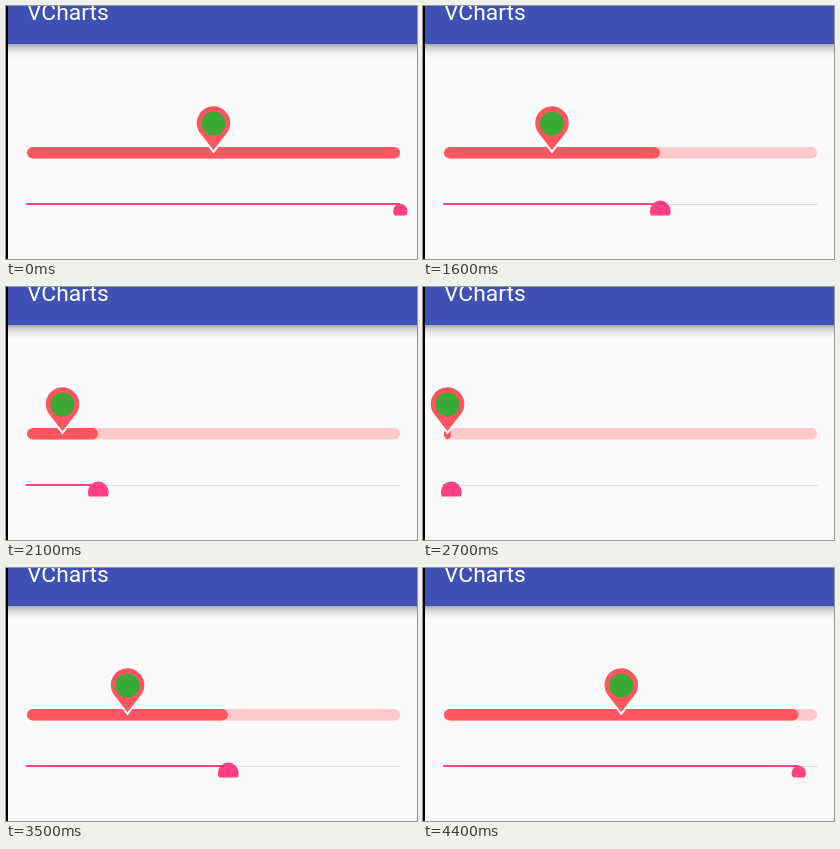
An HTML page with a canvas that plays this animation: 411x253 px, repeating every 4.6 s.

```html
<!DOCTYPE html>
<html lang="en">
<head>
<meta charset="utf-8">
<title>VCharts</title>
<style>
  html, body { margin: 0; width: 100%; height: 100%; overflow: hidden; background: #fafafa; }
  canvas { position: absolute; left: 0; top: 0; width: 411px; height: 253px; }
  h1 {
    position: absolute; left: 21px; top: -8px; margin: 0;
    font: 400 22.8px/30px Roboto, sans-serif; color: #fff; white-space: nowrap;
  }
</style>
</head>
<body>
<canvas id="stage" width="411" height="253"></canvas>
<h1>VCharts</h1>
<script>
const ctx = document.getElementById('stage').getContext('2d');
const LOOP = 4600, STEP = 100;
const BAR = { left: 21, right: 394, top: 141, height: 11.5 };
const RED = '#ff5560', PINK = '#ff4081';

// [time in ms, x of the progress end]
const keys = [
  [1200, 394], [1600, 237], [1700, 201], [2100, 92], [2300, 37], [2500, 21],
  [2600, 21], [2700, 28], [3200, 98], [3500, 222], [3800, 308], [4400, 375.5]
];

const slope = i => (keys[i + 1][1] - keys[i][1]) / (keys[i + 1][0] - keys[i][0]);

// Harmonic mean keeps the curve free of overshoot.
function tangent(i) {
  if (i === 0 || i === keys.length - 1) return 0;
  const a = slope(i - 1), b = slope(i);
  return a * b > 0 ? 2 * a * b / (a + b) : 0;
}

function progressAt(t) {
  if (t <= 1200) return 394;
  if (t >= 4400) return 375.5;
  const i = keys.findIndex((k, n) => t < keys[n + 1][0]);
  const [t0, x0] = keys[i], [t1, x1] = keys[i + 1];
  const d = t1 - t0, u = (t - t0) / d, v = 1 - u;
  return x0 * (1 + 2 * u) * v * v + tangent(i) * d * u * v * v
       + x1 * u * u * (3 - 2 * u) - tangent(i + 1) * d * u * u * v;
}

function rect(x, y, w, h, fill) {
  ctx.fillStyle = fill;
  ctx.fillRect(x, y, w, h);
}

function disc(x, y, r, fill) {
  ctx.fillStyle = fill;
  ctx.beginPath();
  ctx.arc(x, y, r, 0, Math.PI * 2);
  ctx.fill();
}

function bar(end, fill) {
  const { left, top, height } = BAR, w = end - left;
  if (w < 0.5) return;
  const ry = height / 2, rx = Math.min(ry, w / 2), y = top + ry;
  ctx.fillStyle = fill;
  ctx.beginPath();
  ctx.ellipse(left + rx, y, rx, ry, 0, Math.PI / 2, Math.PI * 1.5);
  ctx.ellipse(end - rx, y, rx, ry, 0, -Math.PI / 2, Math.PI / 2);
  ctx.fill();
}

function pin(x) {
  const y = 117, r = 16.8, tip = 144.3;
  const a = Math.acos(r / (tip - y));
  ctx.beginPath();
  ctx.arc(x, y, r, Math.PI / 2 + a, Math.PI * 2.5 - a);
  ctx.lineTo(x, tip);
  ctx.closePath();
  ctx.lineWidth = 4;
  ctx.strokeStyle = '#fff';
  ctx.stroke();
  ctx.fillStyle = RED;
  ctx.fill();
  disc(x, 117.5, 12, '#3aaa35');
}

function header() {
  rect(0, 0, 411, 253, '#fafafa');
  const shade = ctx.createLinearGradient(0, 38, 0, 52);
  shade.addColorStop(0, '#a9a9ad');
  shade.addColorStop(0.25, '#cfcfd1');
  shade.addColorStop(0.6, '#ececec');
  shade.addColorStop(1, '#fafafa');
  rect(0, 38, 411, 14, shade);
  rect(0, 0, 411, 38, '#3f51b5');
  rect(0, 0, 2, 253, '#000');
}

function slider(end, pressed) {
  rect(20, 198, 375, 1, '#dfdcdd');
  rect(20, 197, end - 20, 2, PINK);
  ctx.save();
  ctx.beginPath();
  ctx.rect(0, 180, 411, 29.5);
  ctx.clip();
  disc(end + 0.3, 205, pressed ? 10.4 : 7.2, PINK);
  ctx.restore();
}

function draw(now) {
  const t = Math.floor((now % LOOP) / STEP) * STEP;
  const end = progressAt(t);
  header();
  bar(BAR.right, '#ffc9c9');
  bar(end, RED);
  pin((BAR.left + end) / 2);
  slider(end, t >= 1200 && t < 4400);
}

let start;
function frame(now) {
  if (start === undefined) start = now;
  draw(now - start);
  requestAnimationFrame(frame);
}
draw(0);
requestAnimationFrame(frame);
</script>
</body>
</html>
```
